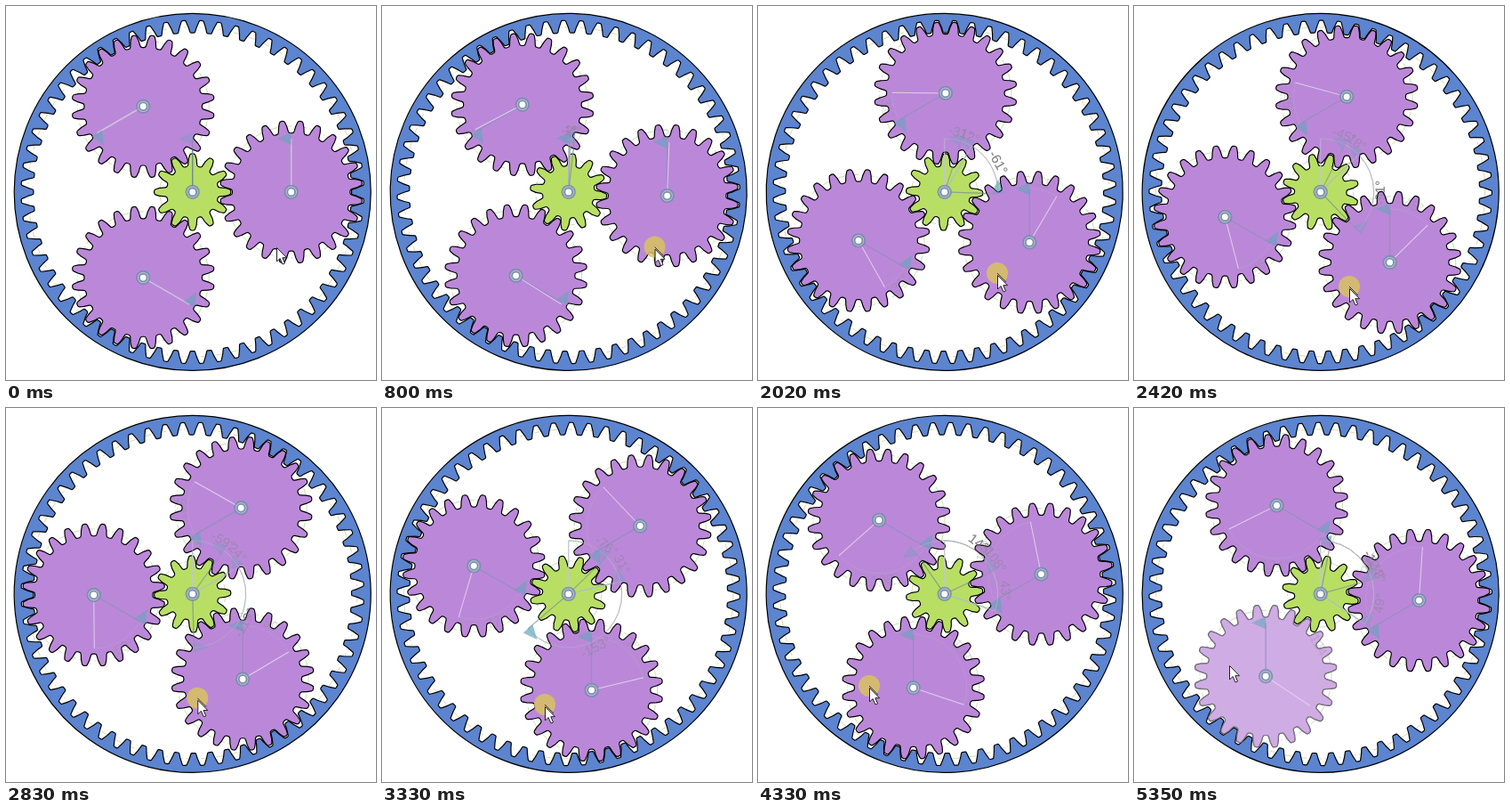
Write an HTML page with a canvas that moves like this. It is 416 px wide and 420 px high and loops after 6.85 s.

```html
<!DOCTYPE html>
<html lang="en">
<head>
<meta charset="utf-8">
<title>Planetary gear</title>
<style>
html, body { margin: 0; width: 100%; height: 100%; overflow: hidden; background: #fff; }
canvas { display: block; }
</style>
</head>
<body>
<canvas id="stage" width="416" height="420"></canvas>
<script>
const ctx = document.getElementById('stage').getContext('2d');
const LOOP = 6850, STEP = 101.1, LAST = 45;
const CX = 209.7, CY = 208.9, MODULE = 111 / 18, ORBIT = 111, ARM = 60;
const TAU = Math.PI * 2, RAD = Math.PI / 180;
const PLANET = '#bb88d9', SUN = '#b8df64', RING = '#5c84cf';

// step, carrier angle, pointer x, pointer y
const KEYS = [
  [0, 0, 304, 271], [8, 11.4, 307, 274], [15, 30.6, 269, 300], [19, 45.4, 242, 315],
  [28, 76.5, 183, 333], [38, 108.4, 125, 312], [45, 123.7, 107, 289]
];

// Smooth curve through one column of KEYS
function track(step, col) {
  const n = KEYS.length;
  let i = 0;
  while (i < n - 2 && step > KEYS[i + 1][0]) i++;
  const slope = j => {
    const p = KEYS[Math.max(0, j - 1)], q = KEYS[Math.min(n - 1, j + 1)];
    return j === 0 ? 0 : (q[col] - p[col]) / (q[0] - p[0]);
  };
  const a = KEYS[i], b = KEYS[i + 1], d = b[0] - a[0], u = (step - a[0]) / d;
  const u2 = u * u, u3 = u2 * u;
  return (2 * u3 - 3 * u2 + 1) * a[col] + (u3 - 2 * u2 + u) * d * slope(i) +
    (3 * u2 - 2 * u3) * b[col] + (u3 - u2) * d * slope(i + 1);
}

// Closed tooth outline; inner = true points the teeth at the centre
function gearPath(teeth, inner, rootWidth, tipWidth, corner) {
  const pitch = teeth * MODULE / 2, half = Math.PI / (2 * teeth), dir = inner ? -1 : 1;
  const tip = pitch + dir * MODULE, root = pitch - dir * MODULE * 1.25;
  const profile = [
    [root, -rootWidth], [pitch, -0.94], [tip, -tipWidth],
    [tip, tipWidth], [pitch, 0.94], [root, rootWidth]
  ];
  const pts = [];
  for (let i = 0; i < teeth; i++) {
    for (const [r, w] of profile) {
      const a = i * TAU / teeth + w * half;
      pts.push([r * Math.cos(a), r * Math.sin(a)]);
    }
  }
  const path = new Path2D(), n = pts.length, end = pts[n - 1];
  path.moveTo((end[0] + pts[0][0]) / 2, (end[1] + pts[0][1]) / 2);
  pts.forEach((p, i) => path.arcTo(...p, ...pts[(i + 1) % n], corner));
  path.closePath();
  return path;
}

const sunPath = gearPath(12, false, 1.34, 0.46, 2.6);
const planetPath = gearPath(24, false, 1.36, 0.48, 2.6);
const ringPath = gearPath(60, true, 1.56, 0.55, 1.4);
ringPath.moveTo(200.5, 0);
ringPath.arc(0, 0, 200.5, 0, TAU);
const arrow = new Path2D('M0.5 0.5V16L4 12.5L7 19L9.5 18L6.8 11.7H11.5Z');

function at(x, y, turn, draw) {
  ctx.save();
  ctx.translate(x, y);
  ctx.rotate(turn * RAD);
  draw();
  ctx.restore();
}

function pitchCircle(x, y, r) {
  ctx.save();
  ctx.strokeStyle = '#d3dbb6';
  ctx.lineWidth = 1;
  ctx.setLineDash([9, 3, 2, 3]);
  ctx.beginPath();
  ctx.arc(x, y, r, 0, TAU);
  ctx.stroke();
  ctx.restore();
}

function gear(path, x, y, turn, fill, edge = '#000') {
  at(x, y, turn, () => {
    ctx.fillStyle = fill;
    ctx.fill(path, 'evenodd');
    ctx.strokeStyle = edge;
    ctx.lineWidth = 1.2;
    ctx.stroke(path);
  });
}

function line(x, y, turn, color, width) {
  at(x, y, turn, () => {
    ctx.strokeStyle = color;
    ctx.lineWidth = width;
    ctx.beginPath();
    ctx.moveTo(0, 0);
    ctx.lineTo(0, -ARM);
    ctx.stroke();
  });
}

function flag(x, y, turn) {
  at(x, y, turn, () => {
    ctx.fillStyle = 'rgba(95,165,185,.55)';
    ctx.beginPath();
    ctx.moveTo(-16, -ARM);
    ctx.lineTo(0, -ARM - 7);
    ctx.lineTo(0, -ARM + 7);
    ctx.fill();
  });
}

function hub(x, y) {
  for (const [r, c] of [[8.2, 'rgba(115,140,170,.8)'], [6.3, '#b4bfd3'], [5.3, '#8093ad'], [3.4, '#fff']]) {
    ctx.fillStyle = c;
    ctx.beginPath();
    ctx.arc(x, y, r, 0, TAU);
    ctx.fill();
  }
}

// Angle dimension from one bearing over a sweep; the text is kept upright
function dimension(x, y, from, sweep) {
  const mid = from + sweep / 2, flip = Math.cos(mid * RAD) < 0;
  at(x, y, 0, () => {
    ctx.strokeStyle = '#b4b8bc';
    ctx.lineWidth = 1;
    ctx.beginPath();
    ctx.arc(0, 0, ARM, (from - 90) * RAD, (from + sweep - 90) * RAD, sweep < 0);
    ctx.stroke();
    ctx.rotate(mid * RAD);
    ctx.translate(0, -68);
    if (flip) ctx.rotate(Math.PI);
    ctx.fillStyle = '#85858c';
    ctx.font = '15px "Liberation Sans", Arial, sans-serif';
    ctx.textAlign = 'center';
    ctx.textBaseline = 'middle';
    ctx.fillText(Math.round(-sweep) + '°', 0, 0);
  });
}

// Bearings of carrier, ring and sun, the last two measured from the carrier
function sunDial(angle) {
  line(CX, CY, 0, angle ? '#c3c7ca' : '#6f8593', 1.2);
  if (angle) {
    const rel = angle * 2 > 180 ? angle * 2 - 360 : angle * 2;
    dimension(CX, CY, 0, angle);
    dimension(CX, CY, angle, rel);
    dimension(CX, CY, angle, -angle * 0.4);
    line(CX, CY, angle, '#b3c0c0', 1.2);
    line(CX, CY, angle * 0.6, 'rgba(125,140,150,.5)', 1.2);
    line(CX, CY, angle * 3, 'rgba(125,140,150,.6)', 1.2);
    flag(CX, CY, angle);
    flag(CX, CY, angle * 0.6);
  }
  flag(CX, CY, angle * 3);
}

function planet(x, y, base, angle, light) {
  gear(planetPath, x, y, 7.5, PLANET);
  if (light) gear(planetPath, x, y, 7.5, `rgba(255,255,255,${0.3 * light})`, `rgba(205,190,215,${0.5 * light})`);
  if (angle) {
    ctx.globalAlpha = 0.28;
    dimension(x, y, base + angle, -angle);
    ctx.globalAlpha = 1;
    line(x, y, base, 'rgba(135,145,185,.65)', 1.5);
    line(x, y, base + angle, '#e0cfe9', 1);
  } else {
    line(x, y, base, '#cbc4da', 1.5);
  }
  flag(x, y, base);
}

function pointer(x, y, pressed) {
  if (pressed) {
    ctx.fillStyle = 'rgba(216,194,95,.85)';
    ctx.beginPath();
    ctx.arc(x, y, 12, 0, TAU);
    ctx.fill();
    ctx.strokeStyle = '#333';
    ctx.lineWidth = 1;
    ctx.beginPath();
    ctx.moveTo(x, y);
    ctx.lineTo(x + 10, y + 10);
    ctx.stroke();
    y += 2;
  }
  at(x, y, 0, () => {
    ctx.fillStyle = '#fff';
    ctx.fill(arrow);
    ctx.strokeStyle = '#222';
    ctx.lineWidth = 1;
    ctx.stroke(arrow);
  });
}

function hover(t) {
  if (t < 100 || (t >= 500 && t < 5240)) return 0;
  if (t < 500) return Math.min(1, Math.floor(t / 100) / 3);
  return t < 5350 ? 0.5 : 1;
}

function draw(t) {
  const step = Math.max(0, Math.min(LAST, Math.floor((t - 480) / STEP)));
  const angle = track(step, 1);
  const planets = [0, 240, 120].map(base => {
    const a = (base + angle) * RAD;
    return [CX + ORBIT * Math.cos(a), CY + ORBIT * Math.sin(a), base];
  });

  ctx.fillStyle = '#fff';
  ctx.fillRect(0, 0, 416, 420);
  pitchCircle(CX, CY, MODULE * 30);
  pitchCircle(CX, CY, MODULE * 6);
  for (const [x, y] of planets) pitchCircle(x, y, MODULE * 12);

  gear(ringPath, CX, CY, angle * 0.6, RING);
  gear(sunPath, CX, CY, angle * 3, SUN);
  sunDial(angle);
  planets.forEach(([x, y, base], i) => planet(x, y, base, angle, i ? 0 : hover(t)));
  ctx.globalAlpha = 0.5;
  sunDial(angle);
  ctx.globalAlpha = 1;

  hub(CX, CY);
  for (const [x, y] of planets) hub(x, y);
  pointer(track(step, 2), track(step, 3), t >= 500 && t < 5240);
}

function tick() {
  draw(performance.now() % LOOP);
  requestAnimationFrame(tick);
}
tick();
</script>
</body>
</html>
```
